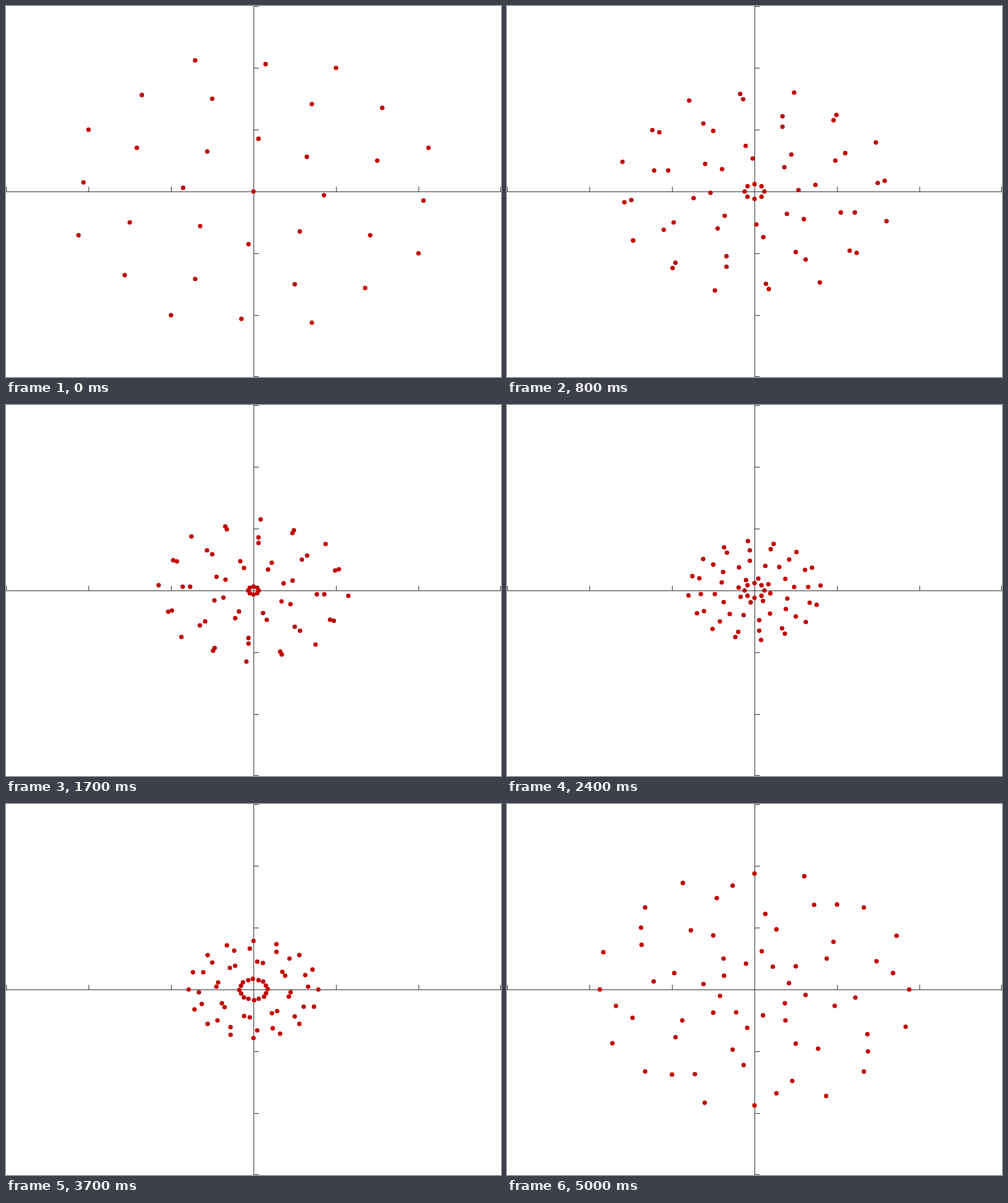
These frames come from a looping animation (840 px wide and 630 px high, 5100 ms). An HTML page with a canvas:

```html
<!DOCTYPE html>
<html lang="en">
<head>
<meta charset="utf-8">
<title>Sums of two rotating octagons</title>
<style>
  html, body { margin: 0; width: 100%; height: 100%; overflow: hidden; background: #fff; }
  canvas { display: block; }
</style>
</head>
<body>
<canvas id="stage" width="840" height="630"></canvas>
<script>
const ctx = document.getElementById('stage').getContext('2d');
const W = 840, H = 630, CX = W / 2, CY = H / 2;
const UNIT_X = W / 6, UNIT_Y = H / 6;
const STEP_MS = 100, STEPS = 51, DOT_RADIUS = 3.8, TICK = 8;

function drawAxes() {
  ctx.fillStyle = '#262626';
  ctx.fillRect(0, CY, W, 1);
  ctx.fillRect(CX, 0, 1, H);
  for (let i = 0; i <= 6; i++) {
    ctx.fillRect(Math.min(i * UNIT_X, W - 1), CY - TICK, 1, TICK);
    ctx.fillRect(CX, Math.min(i * UNIT_Y, H - 1), TICK + 1, 1);
  }
}

// The eight corners of an octagon, starting at (x, y)
function octagon(x, y) {
  return Array.from({ length: 8 }, (_, k) => {
    const c = Math.cos(k * Math.PI / 4), s = Math.sin(k * Math.PI / 4);
    return [x * c - y * s, x * s + y * c];
  });
}

function dot(x, y) {
  ctx.beginPath();
  ctx.arc(CX + x * UNIT_X, CY - y * UNIT_Y, DOT_RADIUS, 0, 2 * Math.PI);
  ctx.fill();
}

function draw(step) {
  const s = step / 20;
  const first = octagon(2 - s, s - 1);
  const second = octagon(2 - s, -((s - 1) ** 2));
  ctx.fillStyle = '#fff';
  ctx.fillRect(0, 0, W, H);
  drawAxes();
  ctx.fillStyle = '#c00000';
  // Coinciding midpoints are drawn once to keep their edges smooth
  const seen = new Set();
  for (const [ax, ay] of first) {
    for (const [bx, by] of second) {
      const x = (ax + bx) / 2, y = (ay + by) / 2;
      const key = Math.round(x * 1e6) + ',' + Math.round(y * 1e6);
      if (seen.has(key)) continue;
      seen.add(key);
      dot(x, y);
    }
  }
}

const start = performance.now();
function tick() {
  draw(Math.floor((performance.now() - start) / STEP_MS) % STEPS);
  requestAnimationFrame(tick);
}
tick();
</script>
</body>
</html>
```
